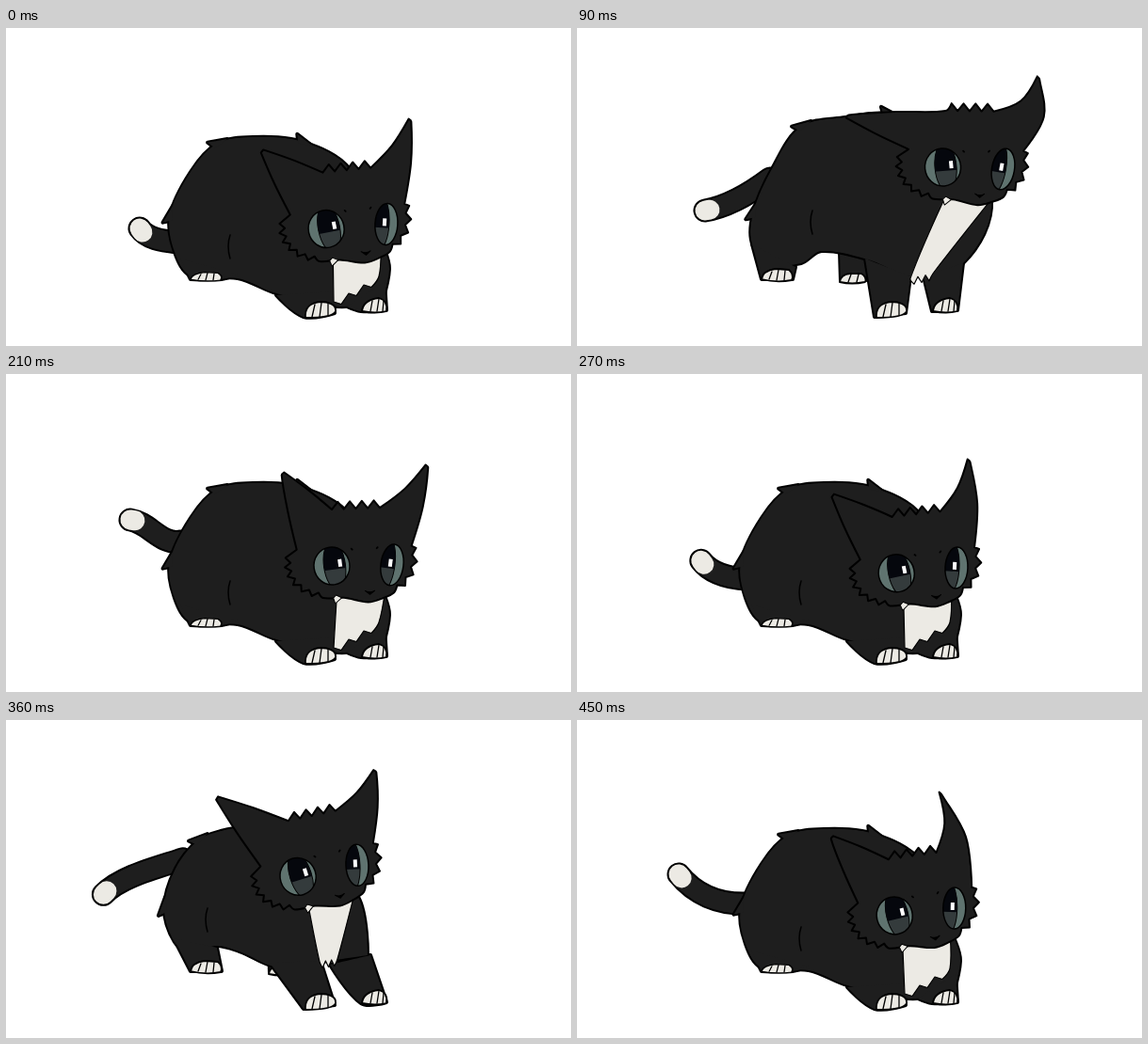
An HTML page with a canvas that plays this animation: 600x338 px, repeating every 480 ms.

```html
<!DOCTYPE html>
<html lang="en">
<head>
<meta charset="utf-8">
<title>Bouncing cat</title>
<style>
html, body { margin: 0; width: 100%; height: 100%; overflow: hidden; background: #fff; }
canvas { display: block; width: 600px; height: 338px; }
</style>
</head>
<body>
<canvas id="stage" width="600" height="338"></canvas>
<script>
const ctx = document.getElementById('stage').getContext('2d');
const FUR = '#1e1e1e', WHITE = '#eceae4', LINE = '#000', TEAL = '#5f736f';
const LOOP = 480;

const pairs = a => a.reduce((out, v, i) => (i % 2 ? out.at(-1).push(v) : out.push([v]), out), []);
const lerp = (a, b, t) => a.map((v, i) => v + (b[i] - v) * t);
const svg = d => new Path2D(d);

// torso: neck, over the back, under the belly, up to the throat
// hips: upper edge of the hind, left front and right front leg
// bib: ragged lower edge of the white chest; crease: thigh line
const crouch = {
  torso: pairs([365,150, 315,121, 262,116, 224,123, 196,153, 174,200, 179,238, 197,264, 246,266, 287,282, 352,296, 400,290, 407,256, 402,236]),
  hips: [[185,245, 246,262], [287,284, 346,280], [362,296, 402,270]],
  bib: [[348,291], [396,264]], crease: [238,220], footHeight: .7
};
const right = {
  torso: pairs([400,112, 330,91, 285,95, 238,105, 208,148, 187,197, 187,232, 210,250, 238,250, 260,237, 312,247, 356,264, 410,250, 440,182]),
  hips: [[186,230, 232,254], [306,245, 354,264], [368,264, 410,250]],
  bib: [[354,266], [378,261]], crease: [250,194], footHeight: 1
};
const left = {
  torso: pairs([310,118, 256,114, 228,118, 204,128, 180,158, 168,200, 179,236, 198,250, 222,240, 248,246, 286,262, 334,257, 384,250, 374,188]),
  hips: [[178,232, 224,242], [280,258, 334,256], [344,260, 387,250]],
  bib: [[333,257], [352,254]], crease: [214,200], footHeight: 1
};

// head: eye midpoint and tilt; ears: both tips; tail: curve from root to tip
const pose = (stance, head, ears, curl, tail) => ({ stance, head, ears, curl: [curl], tail });
const land = pose(crouch, [372,211,-4.5], [272,131, 429,98], 4, [182,228, 165,226, 150,224, 142,213]);
const riseRight = pose(right, [420.5,149,1.8], [287,94, 490,53], 14, [205,160, 185,175, 160,190, 136,194]);
const upRight = pose(right, [416,143.5,1], [316,55, 511,56], 7, [215,142, 170,138, 140,145, 134,174]);
const dropRight = pose(crouch, [378,203.5,-1], [294,106, 447,98], 4, [185,178, 165,182, 152,158, 132,155]);
const riseLeft = pose(left, [344,162,-9.4], [217,99, 416,72], 0, [185,150, 165,175, 155,205, 121,209]);
const upLeft = pose(left, [339.5,159,-12], [230,70, 372,40], 7, [190,146, 150,144, 95,135, 89,166]);
const dropLeft = pose(crouch, [369,204,-7], [271,125, 386,78], 11, [180,195, 150,196, 125,185, 108,164]);

const mix = (a, b, t) => pose(a.stance, lerp(a.head, b.head, t), lerp(a.ears, b.ears, t),
  lerp(a.curl, b.curl, t)[0], lerp(a.tail, b.tail, t));

const STEPS = [
  [0, land], [30, mix(dropLeft, land, 1.2)], [90, riseRight], [120, mix(riseRight, upRight, .55)],
  [150, upRight], [210, dropRight], [240, mix(dropRight, land, .7)], [270, mix(land, dropLeft, .3)],
  [330, riseLeft], [360, mix(riseLeft, upLeft, .55)], [390, upLeft], [450, dropLeft]
];

// Unit vector from a to b
function heading(a, b) {
  const d = Math.hypot(b[0] - a[0], b[1] - a[1]) || 1;
  return [(b[0] - a[0]) / d, (b[1] - a[1]) / d];
}

// Closed curve through points: smooth on gentle bends, sharp on tight ones
function outline(pts) {
  const n = pts.length, at = i => pts[(i + n) % n];
  const dir = pts.map((p, i) => {
    const u = heading(at(i - 1), p), v = heading(p, at(i + 1));
    return u[0] * v[0] + u[1] * v[1] < .55 ? [0, 0] : heading(at(i - 1), at(i + 1));
  });
  const path = new Path2D();
  path.moveTo(...pts[0]);
  for (let i = 0; i < n; i++) {
    const p = pts[i], q = at(i + 1), d = dir[i], e = dir[(i + 1) % n];
    const k = Math.hypot(q[0] - p[0], q[1] - p[1]) / 3;
    path.bezierCurveTo(p[0] + d[0] * k, p[1] + d[1] * k, q[0] - e[0] * k, q[1] - e[1] * k, ...q);
  }
  path.closePath();
  return path;
}

function paint(path, fill, width = 2) {
  if (fill) { ctx.fillStyle = fill; ctx.fill(path); }
  if (width) { ctx.lineWidth = width; ctx.strokeStyle = LINE; ctx.stroke(path); }
}

// Zigzag between two points, both left out; odd points rise by height
function zigzag(a, b, count, height) {
  return Array.from({ length: count - 1 }, (_, i) => {
    const [x, y] = lerp(a, b, (i + 1) / count);
    return [x, y - (i % 2 ? 0 : height)];
  });
}

// Spiky fur along part of an ellipse, angles in degrees
function fringe(cx, cy, rx, ry, from, to, spikes) {
  return Array.from({ length: spikes * 2 + 1 }, (_, i) => {
    const a = (from + (to - from) * i / (spikes * 2)) * Math.PI / 180, r = i % 2 ? .86 : 1;
    return [cx + rx * r * Math.cos(a), cy + ry * r * Math.sin(a)];
  });
}
const CHEEK_R = fringe(20, -8, 39, 40, -14, 70, 4);
const CHEEK_L = fringe(-38, -2, 44, 36, 95, 192, 6);
const CHIN = [[22, 35], [6, 39], [-20, 34]];

const FAR_LEG = svg('M278 238L279 269L307 269L312 238Z');
const FAR_FOOT = svg('M279 270Q280 262 290 261L302 261Q308 265 306 270Q292 273 279 270Z');
const FAR_TOES = svg('M288 270L291 262M297 270L299 262');
const HIND_FOOT = svg('M196 267Q197 258 211 256L225 257Q231 262 228 268Q212 271 196 267Z');
const HIND_TOES = svg('M204 267L207 259M212 268L214 257M220 268L221 258');
const PAWS = svg('M318 308C317 297 324 292 333 291C343 291 351 294 350 301Q347 308 318 308Z' +
  'M378 301C379 292 387 288 396 287Q406 290 404 301Q392 304 378 301Z');
const PAW_TOES = svg('M325 307L328 294M333 307L335 292M342 305L342 293M387 301L389 290M394 301L396 288M400 301L401 290');
const SOLES = [[229,267, 196,267], [349,303, 316,307], [404,300, 377,301]];

function drawTail([x0, y0, x1, y1, x2, y2, x3, y3]) {
  const spine = svg(`M${x0} ${y0}C${x1} ${y1} ${x2} ${y2} ${x3} ${y3}`);
  const [dx, dy] = heading([x3, y3], [x2, y2]);
  const tip = svg(`M${x3} ${y3}l${dx * 5} ${dy * 5}`);
  for (const [path, width, color] of [[spine, 25, LINE], [spine, 21, FUR], [tip, 21, WHITE]]) {
    ctx.lineWidth = width;
    ctx.strokeStyle = color;
    ctx.stroke(path);
  }
}

// Lock of fur standing off the back at point i
function tuft(torso, i) {
  const [x, y] = torso[i], [dx, dy] = heading(torso[i - 1], torso[i + 1]);
  const at = (along, out) => [x + dx * along - dy * out, y + dy * along + dx * out];
  return outline([at(-12, -1), at(8, 6), at(4, -3)]);
}

function drawBody({ torso, hips }) {
  const parts = [
    outline(torso),
    ...[1, 3, 5].map(i => tuft(torso, i)),
    ...hips.map((hip, i) => outline(pairs([...hip, ...SOLES[i]])))
  ];
  parts.forEach(p => paint(p, null, 4));
  parts.forEach(p => paint(p, FUR, 0));
}

function eye(x, y, tilt, rx, ry, pupilX, pupilR, glintX) {
  ctx.save();
  ctx.translate(x, y);
  ctx.rotate(tilt);
  const shape = new Path2D(), pupil = new Path2D();
  shape.ellipse(0, 0, rx, ry, 0, 0, 7);
  pupil.ellipse(pupilX, 0, pupilR, 26, 0, 0, 7);
  paint(shape, TEAL, 0);
  ctx.save();
  ctx.clip(shape);
  paint(pupil, '#343b3c', 1);
  ctx.clip(pupil);
  ctx.fillStyle = '#05070d';
  ctx.fillRect(-30, -30, 60, 34);
  ctx.restore();
  ctx.fillStyle = '#fff';
  ctx.fillRect(glintX - 2, -6, 4, 8);
  paint(shape, null, 1.5);
  ctx.restore();
}

// Ear side from base to tip and back; bulges push the two sides outwards
function ear(from, tip, to, bulgeA, bulgeB) {
  const side = (a, b, bulge) => {
    const [dx, dy] = heading(a, b), [x, y] = lerp(a, b, .5);
    return [x + dy * bulge, y - dx * bulge];
  };
  const [dx, dy] = heading(from, to);
  const blunt = k => [tip[0] + dx * k, tip[1] + dy * k];
  return [from, side(from, tip, bulgeA), blunt(-2), blunt(2), side(tip, to, bulgeB), to];
}

function drawHead({ head: [x, y, deg], ears, curl: [curl] }, place) {
  const [tipL, tipR] = pairs(ears);
  const [outL, inL, inR, outR] = [[-69, -18], [-31, -60], [20, -61], [53, -20]].map(place);
  paint(outline([
    ...ear(outL, tipL, inL, 2, 2), ...zigzag(inL, inR, 8, 8), ...ear(inR, tipR, outR, -curl * .6, curl),
    ...[...CHEEK_R, ...CHIN, ...CHEEK_L].map(place)
  ]), FUR);

  ctx.save();
  ctx.translate(x, y);
  ctx.rotate(deg * Math.PI / 180);
  eye(-32, 0, -.12, 19, 20, 3, 11.5, 9);
  eye(32, 0, .14, 12, 22, -5, 8, -2);
  paint(svg('M3 27Q8 30 13 27L8 31Z'), LINE, 1);
  paint(svg('M-31 34L-28 31L-22 34L-29 40Z'), WHITE, 1);
  paint(svg('M-11 -18l1 1M17 -19l-1 1'), null, 1.8);
  ctx.restore();
}

function draw(p) {
  const { stance, head: [x, y, deg] } = p;
  const c = Math.cos(deg * Math.PI / 180), s = Math.sin(deg * Math.PI / 180);
  const place = ([u, v]) => [x + u * c - v * s, y + u * s + v * c];

  ctx.fillStyle = '#fff';
  ctx.fillRect(0, 0, 600, 338);
  ctx.lineJoin = ctx.lineCap = 'round';

  paint(FAR_LEG, FUR);
  paint(FAR_FOOT, WHITE, 1.8);
  paint(FAR_TOES, null, 1.3);
  drawTail(p.tail);
  drawBody(stance);
  paint(svg(`M${stance.crease}q-4 12 0 25`), null, 1.5);

  const [a, b] = stance.bib;
  paint(outline([place([24, 28]), b, ...zigzag(b, a, 6, -7), a, place([-27, 28])]), WHITE, 1.2);

  ctx.save();
  ctx.translate(0, 268);
  ctx.scale(1, stance.footHeight);
  ctx.translate(0, -268);
  paint(HIND_FOOT, WHITE, 1.8);
  paint(HIND_TOES, null, 1.3);
  ctx.restore();
  paint(PAWS, WHITE, 1.8);
  paint(PAW_TOES, null, 1.3);
  drawHead(p, place);
}

const start = performance.now();
function tick() {
  const t = (performance.now() - start) % LOOP;
  draw(STEPS.findLast(step => step[0] <= t)[1]);
  requestAnimationFrame(tick);
}
tick();
</script>
</body>
</html>
```
